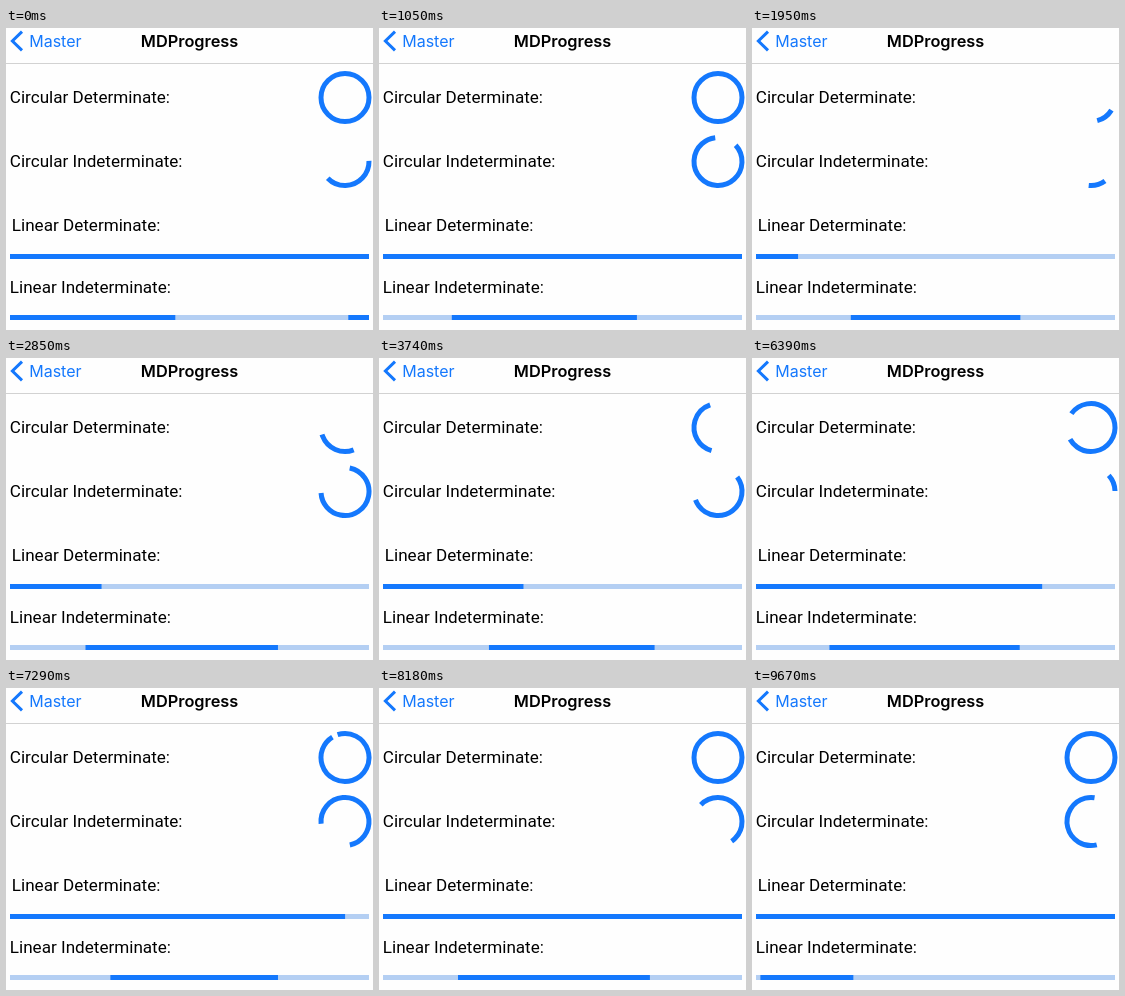
Recreate the animation shown at these times as an HTML page. Size 367 by 302 pixels, loop 9770 ms.

```html
<!DOCTYPE html>
<html lang="en">
<head>
<meta charset="utf-8">
<title>Progress views</title>
<style>
  html, body { margin: 0; width: 100%; height: 100%; overflow: hidden; background: #fefefe; }
  svg { display: block; width: 367px; height: 302px; }
  .nav { font: 16px Inter, "Liberation Sans", sans-serif; }
  .title { font-size: 16.35px; font-weight: 600; text-anchor: middle; }
  .label { font: 17.1px Roboto, sans-serif; }
  .blue { fill: #1478fd; }
  .track { fill: #b4cff3; }
  .ring { fill: none; stroke: #1478fd; stroke-width: 5; }
</style>
</head>
<body>
<svg viewBox="0 0 367 302">
  <path d="M0 35.5H367" stroke="#d2d2d2"/>
  <path d="M16 3.7L6.4 13L16 22.3" fill="none" stroke="#1478fd" stroke-width="3"/>
  <g class="nav">
    <text class="blue" x="23.2" y="19">Master</text>
    <text class="title" x="183.6" y="19">MDProgress</text>
  </g>
  <g class="label">
    <text x="3.8" y="75">Circular Determinate:</text>
    <text x="3.8" y="139">Circular Indeterminate:</text>
    <text x="5.8" y="203">Linear Determinate:</text>
    <text x="3.8" y="265">Linear Indeterminate:</text>
  </g>
  <circle id="ring" class="ring" cx="339" cy="69.5" r="24" pathLength="1"/>
  <circle id="spinner" class="ring" cx="339" cy="133.5" r="24" pathLength="1"/>
  <rect class="track" x="4" y="226" width="359" height="5"/>
  <rect id="bar" class="blue" x="4" y="226" height="5"/>
  <rect class="track" x="4" y="287" width="359" height="5"/>
  <rect id="runA" class="blue" y="287" height="5"/>
  <rect id="runB" class="blue" y="287" height="5"/>
</svg>
<script>
const LOOP = 9770, STEPS = 66, SPIN = 1480, RUN = 1774, LEFT = 4, WIDTH = 359;
const $ = id => document.getElementById(id);
const mod = (a, n) => ((a % n) + n) % n;
const clamp = (x, max = 1) => Math.min(max, Math.max(0, x));

// The picture is held for about 150 ms, a little less in the middle of the loop.
const stepStart = i => 150 * i - 10 * clamp(Math.floor((i - 18) / 4), 8);

function held(t) {
  let i = STEPS - 1;
  while (stepStart(i) > t) i--;
  return stepStart(i);
}

function ease(x) {
  const a = clamp(x) ** 1.74, b = (1 - clamp(x)) ** 1.74;
  return a / (a + b);
}

function setArc(id, angle, length) {
  const c = $(id);
  c.setAttribute("stroke-dasharray", length >= 1 ? "none" : `${length} 2`);
  c.setAttribute("transform",
    `rotate(${angle} ${c.getAttribute("cx")} ${c.getAttribute("cy")})`);
}

function setBar(id, from, to) {
  $(id).setAttribute("x", LEFT + WIDTH * from);
  $(id).setAttribute("width", WIDTH * Math.max(0, to - from));
}

function drawDeterminate(t) {
  const p = t < 1185 ? 1 : clamp((t - 1185) / 6530);
  setArc("ring", 270 * p, 1.03 * p);
  setBar("bar", 0, p);
}

// The arc grows for two thirds of a cycle, then its tail catches up.
function drawSpinner(t) {
  const u = mod(t - 225, SPIN), grow = SPIN * 2 / 3;
  const head = ease(u / grow);
  const tail = .1 * head + .9 * ease((u - grow) / (SPIN - grow));
  setArc("spinner", 136 + .1404 * t + 360 * tail, head - tail);
}

// Two bars take turns: one leaves late and sharply, the other enters fast.
function drawRuns(t) {
  const a = mod(t - 665, RUN), x = clamp((a - 118) / 1003);
  setBar("runA", .72 * x + .28 * x ** 16, 1 - (1 - clamp(a / 640)) ** 1.335);

  const b = mod(t + 113, RUN);
  setBar("runB", clamp((b - 153) / 515), Math.sqrt(clamp(b / 533)));
}

const origin = performance.now();
function tick() {
  const t = held(mod(performance.now() - origin, LOOP));
  drawDeterminate(t);
  drawSpinner(t);
  drawRuns(t);
  requestAnimationFrame(tick);
}
tick();
</script>
</body>
</html>
```
